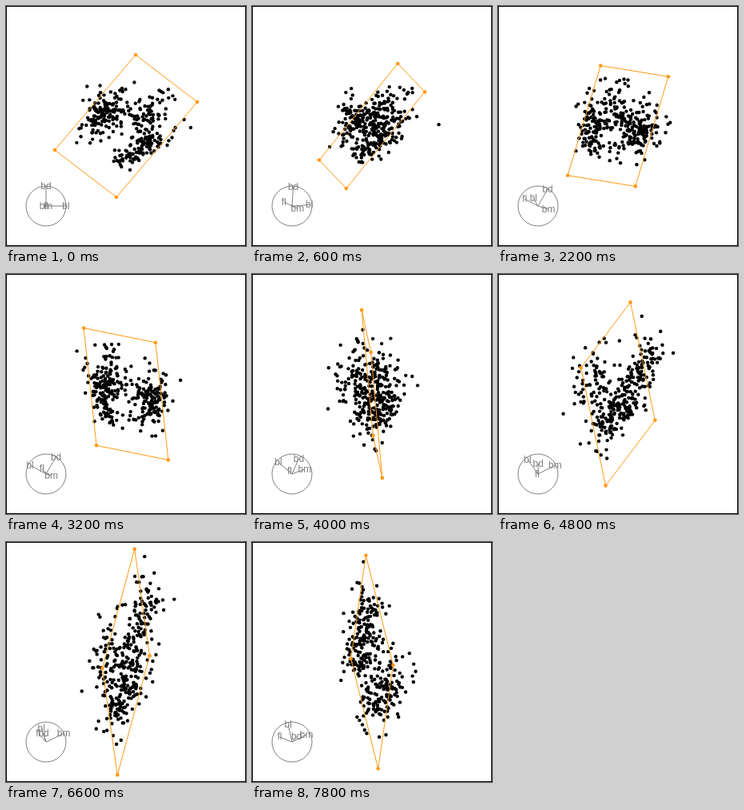
Animation of 300 by 300 pixels, one loop 8000 ms. Source, as an HTML page with a canvas:

```html
<!DOCTYPE html>
<html lang="en">
<head>
<meta charset="utf-8">
<title>Tour of four variables</title>
<style>
  html, body { margin: 0; width: 100%; height: 100%; overflow: hidden; background: #fff; }
  canvas { display: block; width: 300px; height: 300px; }
</style>
</head>
<body>
<canvas id="stage"></canvas>
<script>
const LOOP = 8000, STEP = 200, MID = 150;
const GREY = '#7f7f7f', ORANGE = '#ff9914';
const LABELS = ['bl', 'bd', 'fl', 'bm'];
const MEAN = [43.99, 17.16, 201, 4207];
const SCALE = [5.18, 12.56, 3.26, 0.048];

// Projection planes: time, horizontal axis, vertical axis
const PLANES = [
  [0, [1, 0, 0, 0], [0, 1, 0, 0]],
  [1400, [.38, .3, -.74, .5], [.29, .84, .37, -.21]],
  [3200, [-.78, .5, -.2, .26], [.43, .84, .27, -.07]],
  [4800, [-.52, 0, -.04, .84], [.73, .53, .01, .43]],
  [5600, [-.18, -.32, -.28, .88], [.51, .65, .29, .43]],
  [6000, [.02, -.45, -.37, .8], [.36, .66, .41, .4]],
  [6600, [-.2, -.1, -.36, .86], [.63, .41, .41, .43]],
  [7200, [-.37, .25, -.3, .83], [.81, .14, .36, .42]],
  [7800, [-.2, .22, -.62, .72], [.83, .25, .25, .35]],
];

// Size, mean, spread and common-factor loading of each group
const GROUPS = [
  [136, [38.8, 18.35, 190.1, 3706], [2.55, 1.15, 6.4, 450], [.6, .62, .53, .88]],
  [61, [48.6, 18.4, 195.8, 3733], [3, 1.1, 7, 380], [.69, .82, .73, .77]],
  [114, [47.4, 14.97, 217, 5080], [2.9, .96, 6.4, 490], [.79, .84, .85, .85]],
];
const OUTLIERS = [
  [59.6, 17, 230, 6050], [58, 17.8, 181, 3700], [46, 21.5, 194, 4200],
  [32.1, 15.5, 188, 3050], [54.2, 20.8, 201, 4300], [55.8, 19.8, 207, 4000],
  [55.9, 17, 228, 5600], [42.9, 13.1, 215, 5000], [54.3, 15.7, 231, 5650],
  [55.1, 16, 230, 5850], [34.6, 21.1, 198, 4400], [42.5, 20.7, 197, 4500],
  [49.2, 15.2, 221, 6300], [46.9, 16.6, 192, 2700], [52, 20.7, 210, 4800],
  [33.1, 16.1, 178, 2900], [40.9, 16.6, 187, 3200], [37.9, 18.6, 172, 3150],
];

const CORNER_A = [12, 89, -74, -51], CORNER_B = [89, 30, 84, 76];
const negate = v => v.map(c => -c);
const CORNERS = [CORNER_A, CORNER_B, negate(CORNER_A), negate(CORNER_B)];

let seed = 20;
function random() {
  seed = (seed * 1664525 + 1013904223) % 4294967296;
  return seed / 4294967296;
}
const gauss = () => (random() + random() + random() + random() - 2) * Math.sqrt(3);

function sample(mean, spread, load) {
  const common = gauss();
  return mean.map((m, i) =>
    m + spread[i] * (load[i] * common + Math.sqrt(1 - load[i] ** 2) * gauss()));
}

const points = [
  ...GROUPS.flatMap(([count, ...shape]) => Array.from({ length: count }, () => sample(...shape))),
  ...OUTLIERS,
].map(p => p.map((v, i) => (v - MEAN[i]) * SCALE[i]));

const dot = (u, v) => u.reduce((sum, c, i) => sum + c * v[i], 0);
const mix = (u, v, s, t) => u.map((c, i) => c * s + v[i] * t);

// Nearest orthonormal pair
function orthonormal([x, y]) {
  const xx = dot(x, x), xy = dot(x, y), yy = dot(y, y);
  const root = Math.sqrt(xx * yy - xy * xy);
  const k = 1 / (root * Math.sqrt(xx + yy + 2 * root));
  return [mix(x, y, (yy + root) * k, -xy * k), mix(x, y, -xy * k, (xx + root) * k)];
}

const blend = (a, b, t) => orthonormal([0, 1].map(i => mix(a[i], b[i], 1 - t, t)));

// Repeated halving keeps the turning speed even
function geodesic(a, b, t, depth = 4) {
  if (!depth) return blend(a, b, t);
  const half = blend(a, b, .5);
  return t < .5 ? geodesic(a, half, 2 * t, depth - 1) : geodesic(half, b, 2 * t - 1, depth - 1);
}

const keys = PLANES.map(([time, x, y]) => ({ time, plane: orthonormal([x, y]) }));

function planeAt(time) {
  const next = Math.max(1, keys.findIndex(k => k.time >= time));
  const a = keys[next - 1], b = keys[next];
  return geodesic(a.plane, b.plane, (time - a.time) / (b.time - a.time));
}

const ctx = document.getElementById('stage').getContext('2d');
const ratio = window.devicePixelRatio || 1;
ctx.canvas.width = ctx.canvas.height = 300 * ratio;
ctx.scale(ratio, ratio);
ctx.font = '12px "Liberation Sans", Arial, sans-serif';
ctx.textAlign = 'center';
ctx.textBaseline = 'middle';
ctx.lineWidth = 1;

function disc([x, y], radius) {
  ctx.beginPath();
  ctx.arc(x, y, radius, 0, 2 * Math.PI);
  ctx.fill();
}

function drawAxes([x, y]) {
  ctx.strokeStyle = ctx.fillStyle = GREY;
  ctx.beginPath();
  ctx.arc(50, 250, 25, 0, 2 * Math.PI);
  ctx.stroke();
  LABELS.forEach((label, i) => {
    const tipX = 50 + 25 * x[i], tipY = 250 - 25 * y[i];
    ctx.beginPath();
    ctx.moveTo(50, 250);
    ctx.lineTo(tipX, tipY);
    ctx.stroke();
    ctx.fillText(label, tipX, tipY + .5);
  });
}

function draw(time) {
  const plane = planeAt(time);
  const project = p => [MID + dot(p, plane[0]), MID - dot(p, plane[1])];

  ctx.fillStyle = '#fff';
  ctx.fillRect(0, 0, 300, 300);
  ctx.strokeStyle = '#000';
  ctx.strokeRect(.5, .5, 299, 299);
  drawAxes(plane);

  ctx.fillStyle = '#000';
  points.forEach(p => disc(project(p), 2.2));

  ctx.strokeStyle = ctx.fillStyle = ORANGE;
  const corners = CORNERS.map(project);
  ctx.beginPath();
  corners.forEach(c => ctx.lineTo(...c));
  ctx.closePath();
  ctx.stroke();
  corners.forEach(c => disc(c, 2.3));
}

let shown = -1;
function tick() {
  const time = Math.floor((performance.now() % LOOP) / STEP) * STEP;
  if (time !== shown) draw(shown = time);
  requestAnimationFrame(tick);
}
tick();
</script>
</body>
</html>
```
